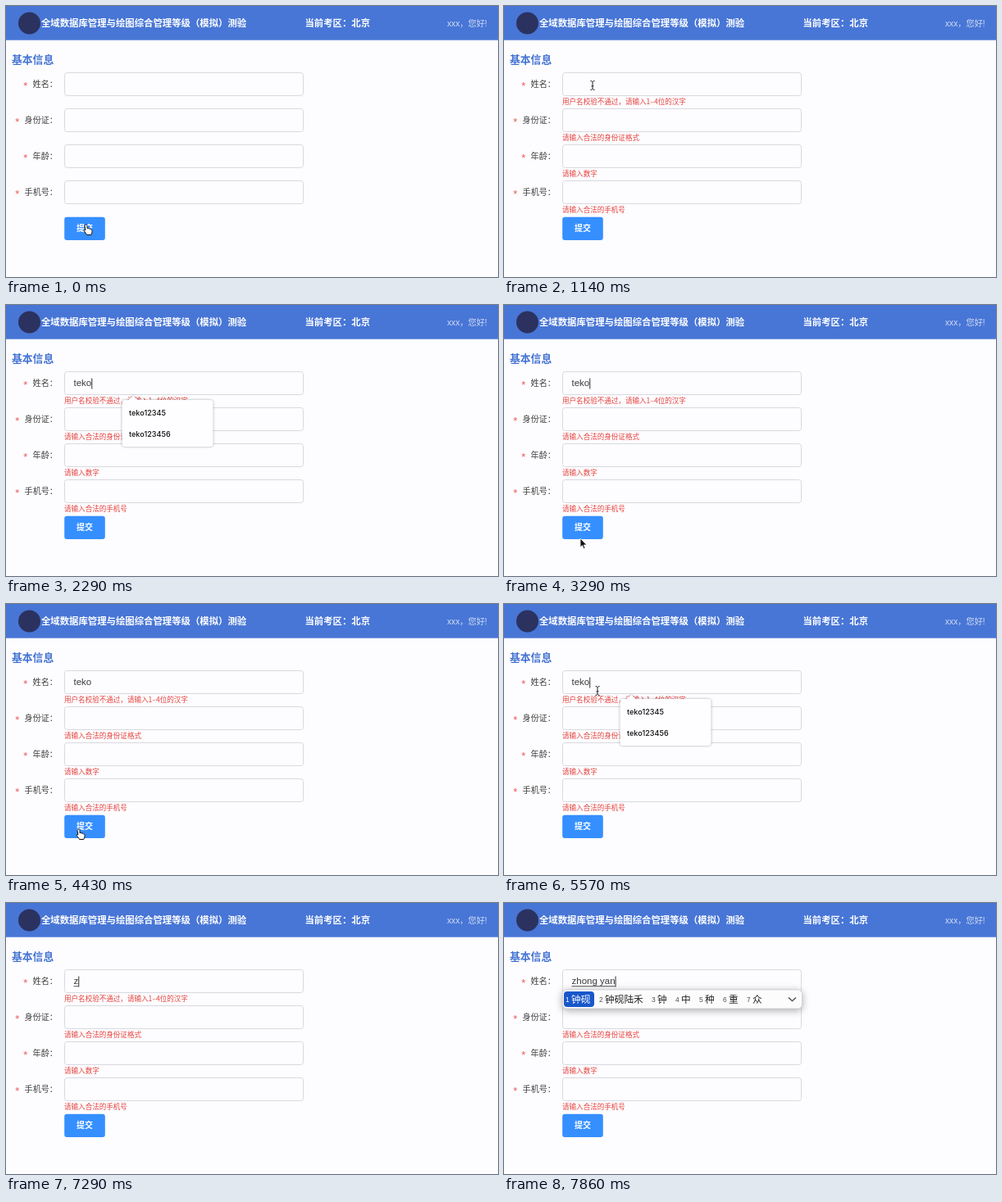
Animation of 600 by 331 pixels, one loop 8 s. Source, as an HTML page:

```html
<!DOCTYPE html>
<html lang="zh-CN">
<head>
<meta charset="utf-8">
<title>基本信息</title>
<style>
  html, body { margin: 0; width: 100%; height: 100%; overflow: hidden; background: #fdfcfe; }
  svg { display: block; width: 600px; height: 331px; }
  text { font-family: "Noto Sans CJK SC", "Noto Sans CJK", "Noto Sans CJK JP", sans-serif; white-space: pre; }
  .latin { font-family: "Liberation Sans", "Noto Sans CJK SC", sans-serif; }
  .heading { font-weight: 700; font-size: 11.38px; fill: #fff; }
  .label { font-size: 10.1px; fill: #3c3c3c; }
  .star { font-size: 13px; fill: #ea5a58; }
  .box { fill: #fdfcfe; stroke: #d7dae0; }
  .error { font-size: 8.55px; fill: #e5403c; }
  .typed { font-size: 11.5px; fill: #3c3c3c; }
  .hint { font: 500 9.1px Inter, sans-serif; fill: #111; }
  .cand { font-size: 11.7px; fill: #222; }
  .num { font: 8.5px "Liberation Sans", sans-serif; fill: #555; }
  .chosen { fill: #fff; }
  #popup { filter: drop-shadow(0 .5px 1.5px #0005); }
  #bar { filter: drop-shadow(0 2px 5px #0005); }
</style>
</head>
<body>
<svg viewBox="0 0 600 331">
  <rect width="600" height="331" fill="#fdfcfe"/>
  <rect width="600" height="41.7" fill="#4876d6"/>
  <circle cx="28.5" cy="21" r="13.5" fill="#2b3260"/>
  <text class="heading" x="43" y="24.8">全域数据库管理与绘图综合管理等级（模拟）测验</text>
  <text class="heading" x="364.5" y="24.8">当前考区：北京</text>
  <text class="latin" x="538" y="25" font-size="10.2" fill="#d3def5">xxx，您好!</text>
  <text x="7" y="69.7" font-size="12.8" font-weight="700" fill="#4373d2">基本信息</text>

  <g id="form"></g>
  <rect x="71.2" y="257.8" width="49.6" height="28.2" rx="3" fill="#358fff"/>
  <text x="86" y="275.2" font-size="10" font-weight="700" fill="#fff">提交</text>

  <text id="typed" class="typed latin" x="82.5" y="99.4"></text>
  <rect id="underline" x="82.5" y="101.2" height="1" fill="#555"/>
  <rect id="caret" y="89.5" width="1" height="13" fill="#333"/>

  <g id="popup">
    <path d="M145 116h4l6-5 6 5h88a3.5 3.5 0 0 1 3.5 3.5v50a3.5 3.5 0 0 1-3.500 3.500h-104a3.500 3.500 0 0 1-3.500-3.500v-50a3.500 3.500 0 0 1 3.500-3.500z" fill="#fefdff"/>
    <text class="hint" x="150" y="135.3">teko12345</text>
    <text class="hint" x="150" y="160.7">teko123456</text>
  </g>

  <g id="bar">
    <rect x="71.5" y="106" width="292" height="23" rx="5" fill="#fcfcfd" stroke="#c8c8cc" stroke-width=".7"/>
    <rect x="73" y="108" width="37" height="19" rx="4" fill="#1857cb"/>
    <g id="candidates"></g>
    <path d="M347 115.500l4.500 4.200 4.500-4.200" fill="none" stroke="#444" stroke-width="1.3"/>
  </g>

  <g id="cursor">
    <path id="hand" d="M-2.500-6c1.200 0 1.500.8 1.500 1.700v3.100c.6-.7 2-.5 2.200.4.700-.5 1.900-.2 2 .7.800-.3 1.800.1 1.800 1.200v2c0 1.500-1 2.100-1.200 3.400h-5.300c-.6-1.900-2.500-3-3.300-4.800-.4-1 .9-1.700 1.700-.6l-.9-5.400c-.1-.9.500-1.700 1.500-1.700z" fill="#fff" stroke="#111" stroke-width="1"/>
    <path id="ibeam" d="M-2.500-5.500q2 0 2.500 1.200q.5-1.200 2.500-1.200M0-4.500v9M-2.500 5.500q2 0 2.500-1.200q.5 1.200 2.500 1.200M-1.500.8h3" fill="none" stroke="#222" stroke-width="1"/>
    <path id="arrow" d="M-3-6v11l2.500-2.300 1.700 4 1.800-.8-1.700-3.800h3.500z" fill="#111" stroke="#fff" stroke-width=".8"/>
  </g>
</svg>
<script>
const $ = id => document.getElementById(id);
const show = (id, on) => $(id).setAttribute('visibility', on ? 'visible' : 'hidden');

const STEP_RATE = 7, STEPS = 56;
const fields = [
  ['姓名', '用户名校验不通过，请输入1–4位的汉字'],
  ['身份证', '请输入合法的身份证格式'],
  ['年龄', '请输入数字'],
  ['手机号', '请输入合法的手机号']
];
$('form').innerHTML = fields.map(([name, error], i) => {
  const y = 81.5 + 44 * i, x = 52.6 - 10 * name.length;
  return `<text class="star latin" x="${x - 11.3}" y="${y + 20.3}">*</text>
    <text class="label" x="${x}" y="${y + 17.5}">${name}：</text>
    <rect class="box" x="71.5" y="${y}" width="291" height="28" rx="3"/>
    <text class="error" x="71" y="${y + 38}">${error}</text>`;
}).join('');
const errors = document.querySelectorAll('.error');

const candidates = [['钟砚', 75], ['钟砚陆禾', 116], ['钟', 180], ['中', 209], ['种', 238], ['重', 267], ['众', 296]];
$('candidates').innerHTML = candidates.map(([word, x], i) => {
  const chosen = i ? '' : ' chosen';
  return `<text class="num${chosen}" x="${x}" y="121">${i + 1}</text>
    <text class="cand${chosen}" x="${x + 7}" y="121.5">${word}</text>`;
}).join('');

// [step, text]: each entry holds until the next
const typing = [[0, ''], [11, 't'], [12, 'te'], [14, 'tek'], [15, 'teko'],
  [43, 'tek'], [44, 'te'], [45, 't'], [46, ''],
  [51, 'z'], [52, 'zho'], [53, 'zhong'], [54, 'zhong y'], [55, 'zhong yan']];

// [step, x, y] of the pointer
const path = [[0, 100, 273], [3, 100, 273], [7, 107, 98], [8, 108, 97], [18, 108, 97],
  [23, 96, 291], [25, 91, 281], [33, 91, 281], [37, 112, 109], [38, 114, 106], [56, 114, 106]];

const within = (k, a, b) => k >= a && k <= b;
const ease = u => u * u * (3 - 2 * u);

function pointerAt(k) {
  const i = path.findIndex((p, n) => k < path[n + 1][0]);
  const [a, x0, y0] = path[i], [b, x1, y1] = path[i + 1];
  const u = ease((k - a) / (b - a));
  return [x0 + (x1 - x0) * u, y0 + (y1 - y0) * u];
}

function shapeAt(x, y) {
  if (x > 71 && x < 121 && y > 260 && y < 288) return 'hand';
  const row = (y - 81) % 44;
  return y > 81 && y < 242 && row < 29 ? 'ibeam' : 'arrow';
}

function draw(k) {
  const text = typing.filter(([step]) => step <= k).pop()[1];
  $('typed').textContent = text;
  const width = text ? $('typed').getComputedTextLength() : 0;
  $('caret').setAttribute('x', 82.5 + width);
  $('underline').setAttribute('width', width);
  show('caret', within(k, 9, 24) || k >= 38);
  show('underline', k >= 51);
  show('popup', within(k, 11, 18) || within(k, 38, 42));
  show('bar', k >= 52);
  errors.forEach(e => e.setAttribute('opacity', k < 2 ? 0 : k < 3 ? .5 : 1));

  const [x, y] = pointerAt(k);
  const visible = !within(k, 10, 17) && k < 43;
  $('cursor').setAttribute('transform', `translate(${x} ${y})`);
  for (const id of ['hand', 'ibeam', 'arrow']) show(id, visible && id === shapeAt(x, y));
}

const start = performance.now();
function tick() {
  const seconds = Math.max(0, performance.now() - start) / 1000;
  draw(Math.floor(seconds * STEP_RATE + .05) % STEPS);
  requestAnimationFrame(tick);
}
tick();
</script>
</body>
</html>
```
